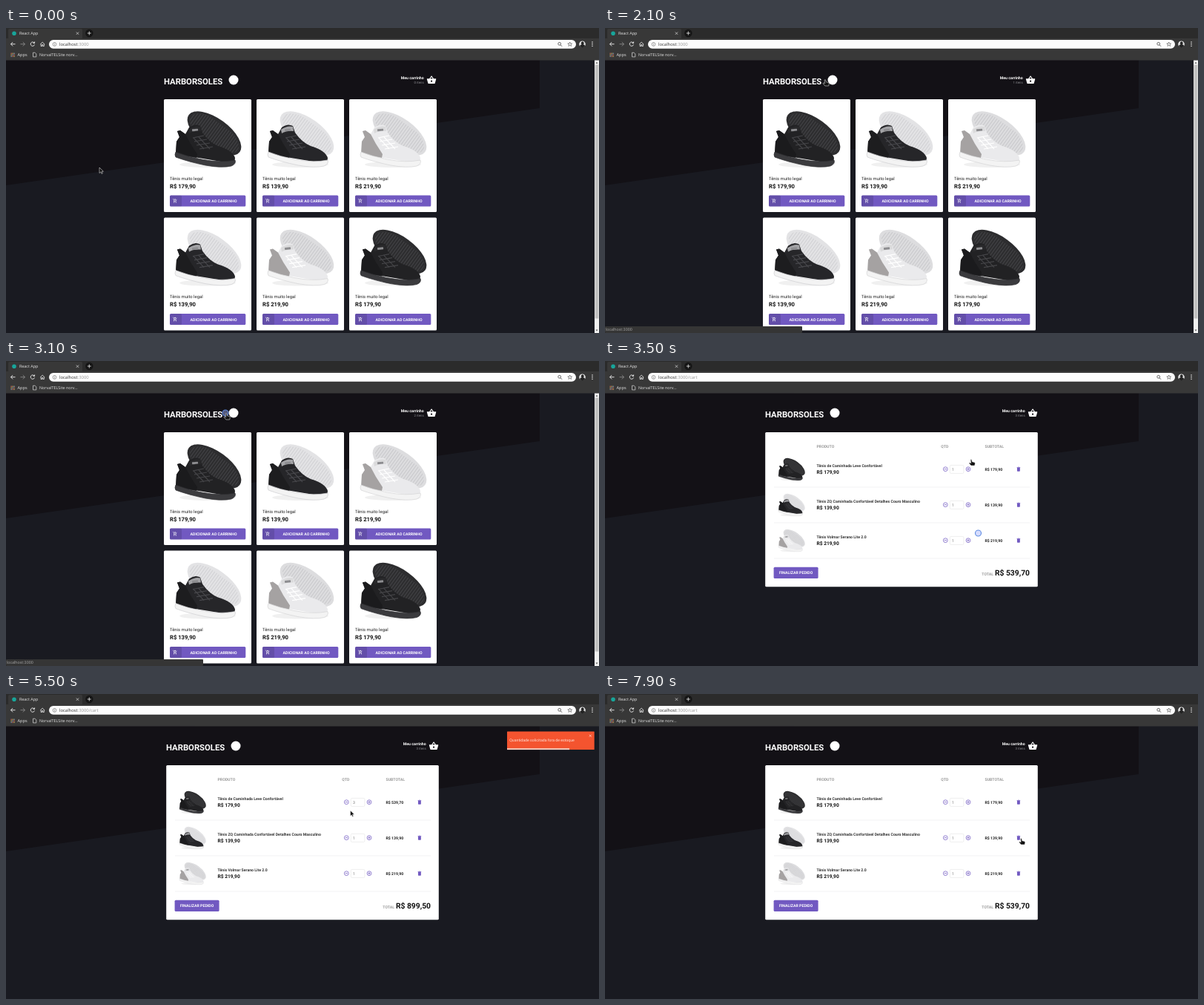
These frames come from a looping animation (800x411 px, 8000 ms). An HTML page:

```html
<!DOCTYPE html>
<html lang="pt-BR">
<head>
<meta charset="utf-8">
<title>React App</title>
<style>
html, body { margin: 0; width: 100%; height: 100%; overflow: hidden; background: #191920; }
svg { display: block; width: 800px; height: 411px; text-rendering: geometricPrecision; }
text { font-family: Roboto, sans-serif; white-space: pre; }
.ui { font-family: "Open Sans", sans-serif; }
.b { font-weight: 700; }
.e { text-anchor: end; }
.m { text-anchor: middle; }
.btn { fill: #7159c1; }
.btn.hover { fill: #5b47a6; }
</style>
</head>
<body>
<svg id="stage" viewBox="0 0 800 411"></svg>
<script>
const LOOP = 8000, STEP = 100;
const $ = id => document.getElementById(id);
const text = (x, y, size, fill, str, cls = '', id = '') =>
  `<text x="${x}" y="${y}" font-size="${size}" fill="${fill}" class="${cls}" id="${id}">${str}</text>`;
const rect = (x, y, w, h, fill, r = 0, extra = '') =>
  `<rect x="${x}" y="${y}" width="${w}" height="${h}" rx="${r}" fill="${fill}" ${extra}/>`;
const line = (d, color, w = 1, extra = '') =>
  `<path d="${d}" fill="none" stroke="${color}" stroke-width="${w}" ${extra}/>`;
const icon = (x, y, size, d, fill) =>
  `<path transform="translate(${x} ${y}) scale(${size / 24})" d="${d}" fill="${fill}"/>`;
const money = v => 'R$ ' + v.toFixed(2).replace('.', ',');

const BASKET = 'M17.2 9l-4.4-6.6a1 1 0 0 0-1.6 0L6.8 9H2a1 1 0 0 0-1 1.3l2.6 9.2A2 2 0 0 0 5.500 21h13a2 2 0 0 0 1.900-1.500L23 10.200A1 1 0 0 0 22 9zM9 9l3-4.400L15 9zm3 8a2 2 0 1 1 0-4 2 2 0 0 1 0 4z';
const CART_ADD = 'M11 9h2V6h3V4h-3V1h-2v3H8v2h3zM7 18a2 2 0 1 0 0 4 2 2 0 0 0 0-4zm10 0a2 2 0 1 0 0 4 2 2 0 0 0 0-4zM7.200 14.700L8.100 13h7.500c.7 0 1.400-.4 1.700-1l3.900-7-1.800-1L15.500 11H8.500L4.300 2H1v2h2l3.600 7.600L5.200 14c-.7 1.400.3 3 1.800 3h12v-2H7.400z';
const TRASH = 'M6 19a2 2 0 0 0 2 2h8a2 2 0 0 0 2-2V7H6zM19 4h-3.500l-1-1h-5l-1 1H5v2h14z';

// Shoe colourways: back sole, groove, upper, heel, midsole, midsole edge, laces
const SHOES = [
  ['#2d2d2f', '#414144', '#222224', '#1b1b1d', '#3b3b3e', '#2c2c2e', '#454548'],
  ['#e3e3e5', '#d3d3d6', '#262629', '#1d1d1f', '#f3f3f3', '#cfcfd1', '#48484c'],
  ['#dddddf', '#cbcbce', '#eaeaec', '#a5a2a2', '#f3f3f3', '#d4d4d6', '#ffffff']
];
const PRICES = [179.9, 139.9, 219.9];
const NAMES = [
  'Tênis de Caminhada Leve Confortável',
  'Tênis ZQ Caminhada Confortável Detalhes Couro Masculino',
  'Tênis Volmar Serano Lite 2.0'
];

function shoe(kind, transform) {
  const [back, groove, upper, heel, sole, edge, lace] = SHOES[kind];
  return `<g transform="${transform}">
    <ellipse cx="272" cy="184" rx="38" ry="4" fill="#000" opacity=".06"/>
    <ellipse cx="281" cy="142" rx="42.500" ry="20" transform="rotate(36 281 142)" fill="${back}"/>
    <g clip-path="url(#sole)">${line('M245 116L318 169', groove, 30, 'stroke-dasharray="1.200 2.200"')}</g>
    <path d="M231 139l4-1 7 5 5-9q8-6 15-2l3 9q9 13 21 18 20 6 23 16l-1 8-79-13 1-17 4-6z" fill="${upper}"/>
    <path d="M231 139l4-1 7 5 7 13 9 14-1 5-28-5 1-17 4-6z" fill="${heel}"/>
    <path d="M246 137q8-6 16-4l1 6q-9-1-16 3z" fill="${edge}" opacity=".75"/>
    ${rect(251, 136, 8, 3, '#8d8d90', .5, 'transform="rotate(-6 255 137)"')}
    ${line('M252 148l15-3m-13 8l17-3m-14 8l18-3m-14 8l18-3m-26-12l14 15m-7-16l15 16', lace, 1.1)}
    <path d="M229 167q15 6 35 10 25 5 45 1 2 5-5 8-12 3-35-1-24-5-40-11-2-3 0-7z" fill="${sole}" stroke="${edge}" stroke-width=".7"/>
  </g>`;
}

function card(i) {
  const kind = [0, 1, 2, 1, 2, 0][i];
  return `<g transform="translate(${i % 3 * 125} ${i > 2 ? 159.6 : 0})">
    ${rect(213, 96, 118, 152, '#fff', 1.5)}
    ${shoe(kind, '')}
    ${text(221, 204.6, 5.9, '#222', 'Tênis muito legal')}
    ${text(221, 215.7, 7.65, '#111', money(PRICES[kind]), 'b')}
    ${rect(221, 225.5, 102.3, 15, '', 1.5, `class="btn" id="buy${i}"`).replace('fill=""', '')}
    ${rect(221, 225.5, 16, 15, 'rgba(0,0,0,.12)', 1.5)}
    ${icon(224.8, 229.7, 6.4, CART_ADD, '#fff')}
    ${text(280, 235, 5.2, '#fff', 'ADICIONAR AO CARRINHO', 'b m')}
  </g>`;
}

function row(i) {
  const round = (x, d) => `<circle cx="${x}" cy="145.700" r="2.900" fill="none" stroke="#7159c1" stroke-width=".75"/>` + line(d, '#7159c1', .75);
  return `<g id="row${i}" transform="translate(0 ${i * 48})">
    ${shoe(i, 'translate(142.8 86) scale(.4)')}
    ${text(285.5, 143, 5.2, '#333', NAMES[i], 'b')}
    ${text(285.5, 152.4, 6.6, '#111', money(PRICES[i]), 'b')}
    ${round(459.3, 'M457.7 145.700h3.200')}
    ${rect(465.3, 140.4, 18.6, 11, '#fff', 1.4, 'stroke="#ddd" stroke-width=".5"')}
    ${text(468, 147.8, 5.2, '#777', '1', '', 'qty' + i)}
    ${round(490, 'M488.4 145.700h3.200m-1.600-1.600v3.200')}
    ${text(512.5, 147.9, 5.2, '#222', money(PRICES[i]), 'b', 'sub' + i)}
    ${icon(554, 141.8, 7.8, TRASH, '#7159c1')}
    ${line('M228 170h345', '#e9e9ec', .6)}
  </g>`;
}

const dots = [0, 1, 2].map(r => [0, 1, 2].map(c =>
  rect(6.5 + c * 2, 33.6 + r * 2, 1.3, 1.3, ['#d96a5b', '#c9b05c', '#8fa3b8'][(r + c) % 3])).join('')).join('');

const browser = `
  ${rect(0, 0, 800, 14.500, '#2b2b2b')}
  ${rect(3, 1, 100, 14, '#383838', 2)}
  ${rect(0, 14, 800, 29.5, '#383838')}
  <circle cx="11" cy="7.300" r="2.800" fill="#18a59a"/>
  ${text(18, 9.300, 5.4, '#e6e6e6', 'React App', 'ui')}
  ${line('M94.800 5.500l3.400 3.400m0-3.400l-3.400 3.400', '#ddd', .7)}
  <circle cx="112.300" cy="7" r="5.200" fill="#151515"/>
  ${line('M109.800 7h5m-2.500-2.500v5', '#eee', .8)}
  ${line('M12.500 21.700h-6m2.700-2.700l-2.700 2.700 2.700 2.700', '#eee', .9)}
  ${line('M19.500 21.700h6m-2.700-2.700l2.700 2.700-2.700 2.700', '#8a8a8a', .9)}
  ${line('M38 19.900a2.700 2.700 0 1 0 .5 2.500m.1-4v2h-2', '#eee', .9)}
  ${line('M46.200 22l3-2.900 3 2.900m-5.100-.5v3h1.500v-2h1.200v2h1.500v-3', '#eee', .8)}
  ${rect(58, 16.1, 711, 11.7, '#fcfcfc', 5.8)}
  <circle cx="65.500" cy="21.900" r="2.400" fill="none" stroke="#666" stroke-width=".6"/>
  ${line('M65.500 21.500v1.800m0-2.900v.6', '#666', .6)}
  <text class="ui" x="72" y="24.100" font-size="5.900" fill="#333">localhost<tspan fill="#999" id="path">:3000</tspan></text>
  <circle cx="746.700" cy="21.300" r="1.900" fill="none" stroke="#444" stroke-width=".8"/>
  ${line('M748 22.700l2 2', '#444', .9)}
  <path d="M760.700 19l.8 1.900 2.100.1-1.600 1.300.6 2.100-1.900-1.200-1.800 1.200.6-2.100-1.700-1.300 2.200-.1z" fill="none" stroke="#444" stroke-width=".6"/>
  <circle cx="777.500" cy="21.700" r="4.300" fill="#e6e6e6"/>
  <path d="M774 24.300q.5-2 3-2.200a1.900 1.900 0 1 1 1.500 0q2.300.3 2.700 2.200a4.300 4.300 0 0 1-7.200 0z" fill="#222"/>
  ${[19, 21.600, 24.200].map(y => `<circle cx="791" cy="${y}" r=".8" fill="#eee"/>`).join('')}
  ${dots}
  ${text(15.5, 38.2, 5.6, '#e6e6e6', 'Apps', 'ui')}
  <path d="M36.500 33.200h2.600l1.700 1.700v4h-4.300z" fill="none" stroke="#ddd" stroke-width=".7"/>
  ${text(45, 38.2, 5.4, '#e6e6e6', 'NorvalTELSite norv...', 'ui')}`;

$('stage').innerHTML = `
  <defs>
    <clipPath id="sole"><ellipse cx="281" cy="142" rx="39" ry="17" transform="rotate(36 281 142)"/></clipPath>
  </defs>
  ${rect(0, 43, 800, 368, '#191a21')}
  <path d="M0 43H720V108L0 212Z" fill="#131116"/>
  ${browser}
  <g id="header">
    ${text(213, 75.700, 11.3, '#fff', 'HARBORSOLES', 'b')}
    <circle cx="307" cy="70" r="6.500" fill="#fff"/>
    ${text(563.7, 69, 5.2, '#fff', 'Meu carrinho', 'b e')}
    ${text(563.7, 75.200, 4.4, '#8b8b90', '', 'e', 'count')}
    ${icon(567.3, 63.3, 13.5, BASKET, '#fff')}
  </g>
  <g id="home">
    ${[0, 1, 2, 3, 4, 5].map(card).join('')}
    ${rect(794, 43.5, 6, 368, '#f1f1f1')}
    ${rect(794.6, 49.5, 4.8, 342, '#c1c1c1')}
    <path d="M795.500 47.700l1.500-2 1.500 2zM795.500 406.500l1.500 2 1.500-2z" fill="#555"/>
  </g>
  <g id="cart">
    ${rect(216.2, 96, 367.600, 208.300, '#fff', 1.5, 'id="panel"')}
    ${text(285.5, 116.8, 5.2, '#999', 'PRODUTO', 'b')}
    ${text(453.3, 116.8, 5.2, '#999', 'QTD', 'b')}
    ${text(512.5, 116.8, 5.2, '#999', 'SUBTOTAL', 'b')}
    ${[0, 1, 2].map(row).join('')}
    <g id="foot">
      ${rect(227.600, 277.800, 60, 15.300, '#7159c1', 1.5)}
      ${text(257.600, 287.3, 5.2, '#fff', 'FINALIZAR PEDIDO', 'b m')}
      ${text(508.3, 289, 5.2, '#999', 'TOTAL', 'b')}
      ${text(573, 289, 10.3, '#111', '', 'b e', 'total')}
    </g>
  </g>
  <g id="toast">
    ${rect(676, 50.5, 117.7, 24.600, '#f4542f', .5)}
    ${text(679.3, 64.400, 5.2, '#ffe3da', 'Quantidade solicitada fora de estoque')}
    ${line('M786.800 54.800l3 3m0-3l-3 3', '#ffe3da', .7)}
    ${rect(676, 73.200, 117.7, 1.900, '#ffd0c2', 0, 'id="bar"')}
  </g>
  <g id="status">
    ${rect(0, 402, 266, 9, '#353535', 1)}
    ${text(1, 408.300, 5.3, '#aaa', 'localhost:3000', 'ui')}
  </g>
  <circle id="ring" r="4" fill="rgba(165,180,255,.45)" stroke="#5f8be0" stroke-width="1.100"/>
  <path id="arrow" d="M0 0v7.500l1.800-1.600 1.200 2.500 1.300-.6-1.200-2.400 2.300-.2z" fill="#111" stroke="#fff" stroke-width=".5"/>
  <path id="hand" d="M-.9 0q.9-1 1.600 0l.6 2.800 3 .7q1.200.5 1 1.800l-.6 2.700H-.2L-2.800 5q-.4-1.300 1.100-1l1.300.8z" fill="#111" stroke="#fff" stroke-width=".5"/>`;

// Pointer stops: time, x, y
const MOVES = [
  [0, 126, 188], [200, 126, 188], [400, 270, 392], [600, 520, 392], [700, 638, 310], [1000, 430, 262],
  [1300, 295, 236], [1600, 295, 236], [1900, 297, 70], [2100, 297, 70], [2500, 379, 228], [2700, 379, 228],
  [3000, 297, 71], [3100, 297, 71], [3300, 503, 231], [3400, 503, 231], [3500, 494, 133], [3700, 490, 145],
  [5200, 490, 145], [5500, 464.5, 157], [5800, 459, 146], [7100, 459, 146], [7700, 560, 212], [7800, 561, 203], [7900, 561.5, 195]
];
// Clicks: start, end, x, y
const CLICKS = [[1500, 1600, 295, 235], [2000, 2100, 297, 70], [2600, 2700, 379, 229], [3100, 3200, 296, 70], [3300, 3600, 503.5, 232]];
const PAGES = [[0, 'home'], [1700, 'cart'], [2100, 'home'], [2800, 'cart'], [3100, 'home'], [3400, 'cart']];
const ITEMS = [[0, 0], [1700, 1], [2800, 2], [3400, 3]];
const QTY = [[0, 1], [4200, 2], [4800, 3], [6300, 2], [7100, 1]];
const TOAST_IN = 5100, TOAST_OUT = 6500;

const at = (list, t) => list.filter(s => s[0] <= t).pop()[1];
const show = (id, on) => { $(id).style.display = on ? '' : 'none'; };
const move = (id, x, y) => $(id).setAttribute('transform', `translate(${x} ${y})`);

function pointer(t) {
  const n = MOVES.findIndex(m => m[0] > t);
  if (n < 0) return MOVES[MOVES.length - 1].slice(1);
  const [t0, x0, y0] = MOVES[n - 1], [t1, x1, y1] = MOVES[n];
  const p = (t - t0) / (t1 - t0), k = p * p * (3 - 2 * p);
  return [x0 + (x1 - x0) * k, y0 + (y1 - y0) * k];
}

function draw(t) {
  const page = at(PAGES, t), home = page === 'home';
  const items = at(ITEMS, t), qty = at(QTY, t);
  const [x, y] = pointer(t);

  show('home', home);
  show('cart', !home);
  move('header', home ? 0 : 3, 0);
  $('path').textContent = home ? ':3000' : ':3000/cart';
  $('count').textContent = items + ' itens';

  let total = 0;
  for (let i = 0; i < 3; i++) {
    show('row' + i, i < items);
    if (i < items) total += PRICES[i] * (i ? 1 : qty);
  }
  $('qty0').textContent = qty;
  $('sub0').textContent = money(PRICES[0] * qty);
  $('total').textContent = money(total);
  $('panel').setAttribute('height', 208.3 - 48 * (3 - items));
  move('foot', 0, -48 * (3 - items));

  let over = false;
  for (let i = 0; i < 6; i++) {
    const bx = 221 + i % 3 * 125, by = i > 2 ? 385 : 225.5;
    const hit = home && x > bx && x < bx + 102 && y > by && y < by + 15;
    $('buy' + i).classList.toggle('hover', hit);
    over = over || hit;
  }
  const logo = y > 62 && y < 78 && x > 213 && x < 320;
  const control = !home && ((y < 150 && y > 130 && (x > 485 && x < 496 || x > 455 && x < 463)) || (x > 554 && y > 188 && y < 200));
  const hand = over || logo || control;
  show('hand', hand);
  show('arrow', !hand);
  move(hand ? 'hand' : 'arrow', x, y);
  show('status', logo);

  const click = CLICKS.find(c => t >= c[0] && t < c[1]);
  show('ring', click);
  if (click) move('ring', click[2], click[3]);

  const open = t >= TOAST_IN && t < TOAST_OUT;
  show('toast', open);
  if (open) {
    const slide = Math.max(0, 1 - (t - TOAST_IN + 100) / 200);
    move('toast', 124 * slide * slide, 0);
    $('bar').setAttribute('width', 117.7 * (1 - (t - TOAST_IN) / (TOAST_OUT - TOAST_IN)));
  }
}

function tick(now) {
  draw(Math.floor(now % LOOP / STEP) * STEP);
  requestAnimationFrame(tick);
}
draw(0);
requestAnimationFrame(tick);
</script>
</body>
</html>
```
